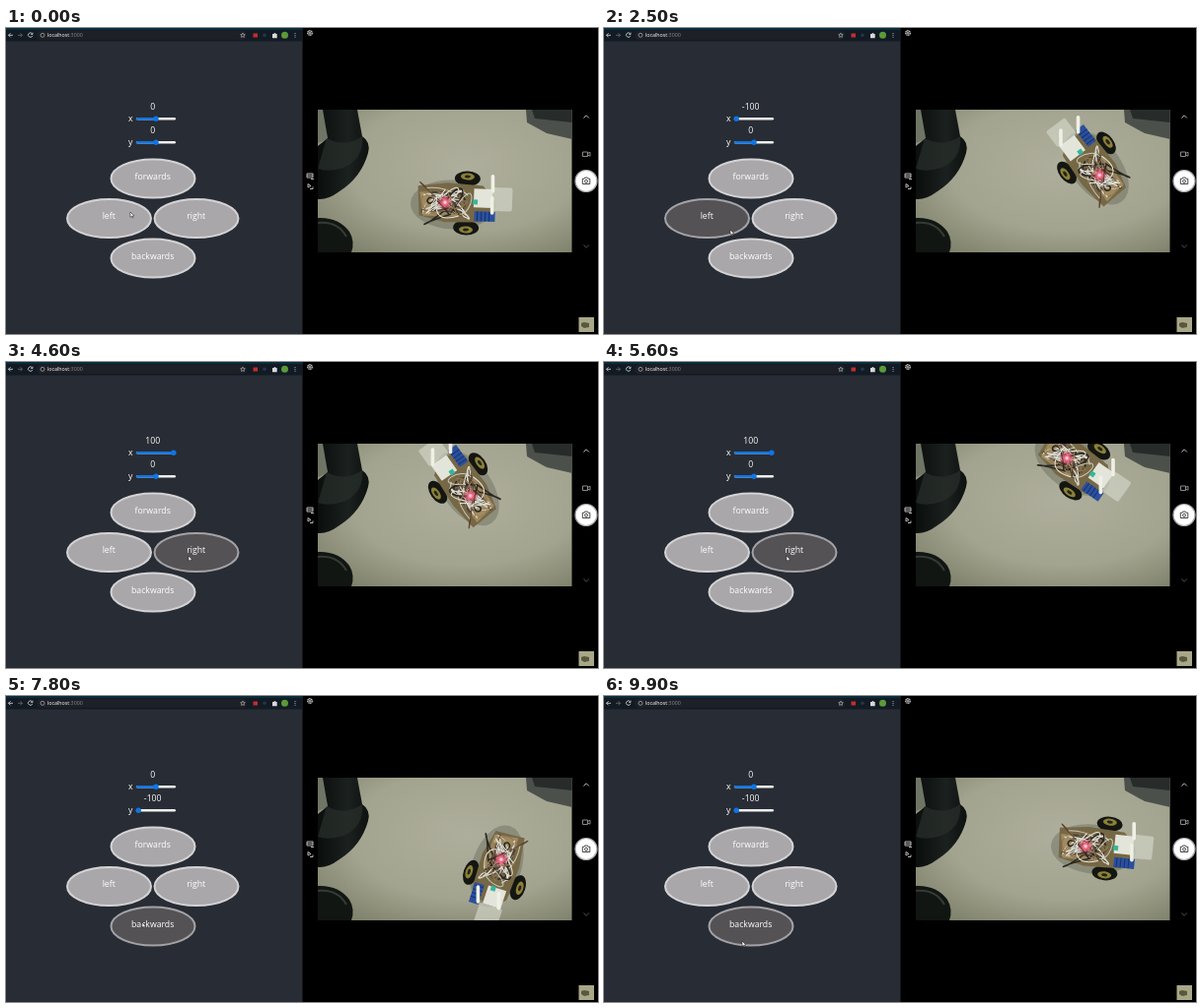
Write an HTML page that moves like this. It is 600x311 px and loops after 10 s.

```html
<!DOCTYPE html>
<html lang="en">
<head>
<meta charset="utf-8">
<title>Robot remote control</title>
<style>
html, body { margin: 0; height: 100%; overflow: hidden; background: #000; }
svg { display: block; }
text { font-family: "Open Sans", "Noto Sans", sans-serif; fill: #fff; }
#panel text { font-size: 8.7px; text-anchor: middle; }
#panel ellipse { fill: #a9a7a9; stroke: #d3d3d5; stroke-width: 2; }
#panel .on ellipse { fill: #545254; stroke: #a3a3a7; }
.icon { fill: none; stroke: #ccc; stroke-width: .9; }
</style>
</head>
<body>
<svg width="100%" height="100%" viewBox="0 0 600 311">
  <defs>
    <radialGradient id="floor" cx=".58" cy=".4" r=".75">
      <stop offset="0" stop-color="#aeae9c"/>
      <stop offset=".6" stop-color="#a3a48f"/>
      <stop offset="1" stop-color="#7d806a"/>
    </radialGradient>
    <radialGradient id="glow">
      <stop offset="0" stop-color="#fff"/>
      <stop offset=".3" stop-color="#f36b86"/>
      <stop offset="1" stop-color="#a0102c" stop-opacity="0"/>
    </radialGradient>
    <linearGradient id="stool">
      <stop offset="0" stop-color="#0a0e0d"/>
      <stop offset=".6" stop-color="#1b211f"/>
      <stop offset="1" stop-color="#0d1110"/>
    </linearGradient>
  </defs>

  <rect width="600" height="311"/>
  <rect width="300.5" height="311" fill="#282c34"/>

  <!-- browser bar -->
  <rect width="300.5" height="13.5" fill="#121b24"/>
  <rect width="300.5" height="2" fill="#0b2c3c"/>
  <rect x="31" y="2.8" width="213" height="9.2" rx="4.6" fill="#1d2026"/>
  <g class="icon" stroke-width=".8">
    <path d="M7 7.3H2.500M4.500 5.300l-2 2 2 2" />
    <path d="M12 7.300h4.500M14.500 5.300l2 2-2 2" stroke="#666"/>
    <path d="M26.500 5.800a2.200 2.200 0 1 0 .3 2M27 4.700v1.700h-1.700"/>
    <circle cx="37" cy="7.300" r="2" stroke="#999"/>
    <path d="M240 5l.7 1.500 1.600.2-1.200 1.100.3 1.600-1.400-.8-1.400.8.3-1.600-1.200-1.100 1.600-.2z" stroke-width=".6"/>
  </g>
  <text x="42" y="9.3" font-size="5.3">localhost<tspan fill="#858990">:3000</tspan></text>
  <rect x="250.500" y="5.500" width="4.500" height="4" fill="#c62c30"/>
  <circle cx="262" cy="7.300" r="1.800" fill="#25364a"/>
  <path d="M270 6h1.500a1 1 0 0 1 2 0h1.200v4.200H270z" fill="#d8d8d8"/>
  <circle cx="282.500" cy="7.300" r="3.500" fill="#5a9a38"/>
  <path d="M293 5v.9m0 1v.9m0 1v.9" class="icon"/>

  <g id="panel"></g>

  <!-- camera view -->
  <svg x="316" y="83" width="257.500" height="145" viewBox="316 83 257.5 145">
    <rect x="316" y="83" width="258" height="145" fill="url(#floor)"/>
    <path d="M316 83h6l4 30-10 4z" fill="#6f7565"/>
    <path d="M527 83h47v30l-26-6-20-11z" fill="#4b504b"/>
    <path d="M533 83h41v13l-38-4z" fill="#272c2a"/>
    <path d="M321 83H356L361 110Q370 116 367 127Q360 152 338 166Q326 175 316 174V120L326 112z" fill="url(#stool)"/>
    <path d="M325 112Q344 122 361 110Q363 133 342 142Q326 147 316 143" fill="#29302c" opacity=".7"/>
    <path d="M316 193Q337 192 348 207Q354 217 350 228H316z" fill="#111613"/>
    <path d="M316 198Q336 196 345 212" fill="none" stroke="#343b34" stroke-width="2"/>
    <g id="robot">
      <ellipse cx="-14" cy="2" rx="43" ry="25" fill="#33342a" opacity=".25"/>
      <g id="wheels"></g>
      <path d="M-50-16L-20-20 16-18 24-9V12L14 19-22 20-48 14z" fill="#766845"/>
      <path d="M-48-10H-8V14H-44z" fill="#a08a60"/>
      <rect x="-36" y="-11" width="28" height="21" fill="#4e443a"/>
      <rect x="7" y="-15" width="19" height="19" fill="#e3e5da"/>
      <rect x="26" y="-17" width="20" height="24" rx="2" fill="#d5d7ca" opacity=".65"/>
      <rect x="6" y="-4" width="5" height="5" fill="#35b69a"/>
      <rect x="8" y="8" width="21" height="10" fill="#2b4f9d"/>
      <path d="M11 8v10m4-10v10m4-10v10m4-10v10" stroke="#17326e"/>
      <g id="wires" fill="none"></g>
      <circle cx="-22" r="8" fill="url(#glow)"/>
      <g stroke="#f0f0e6" stroke-width="3.600" stroke-linecap="round">
        <path class="prong" d="M0 0V-15"/>
        <path class="prong" d="M0 0V-15"/>
      </g>
    </g>
  </svg>

  <!-- camera controls -->
  <g class="icon">
    <circle cx="308" cy="5" r="2.300" stroke-width="1.300" stroke-dasharray="1.300 .5"/>
    <circle cx="308" cy="5" r="1"/>
    <path d="M305 148h6v4h-6zM305 150h6M309 153.500h3"/>
    <path d="M306 158.500l3 2-3 1.500zM308 163.500h3v-2"/>
    <path d="M585.500 91.500l2.700-2.700 2.700 2.700"/>
    <path d="M585.500 220.500l2.700 2.700 2.700-2.700" stroke="#555"/>
    <path d="M584.500 126h5v4.500h-5zM589.500 127.500l2.500-1.300v4l-2.500-1.200" stroke="#999"/>
  </g>
  <circle cx="588" cy="155.500" r="11" fill="#fff" stroke="#aaa" stroke-width="1.200"/>
  <g fill="none" stroke="#333" stroke-width=".9">
    <path d="M584.300 153.200h1.700l.8-1.200h2.500l.8 1.200h1.700v5.300h-7.500z"/>
    <circle cx="588" cy="155.700" r="1.500"/>
  </g>
  <rect x="580.500" y="294" width="15.500" height="15" fill="#a8a888"/>
  <path d="M583 300l3-1 5 1v4l-5 1-3-2z" fill="#59583f"/>

  <path id="cursor" d="M0 0V5.200L1.300 4.200 2.200 6 3 5.600 2.200 3.900H3.800z" fill="#fff" stroke="#111" stroke-width=".5"/>
</svg>

<script>
const $ = id => document.getElementById(id);
const LOOP = 10000, STEP = 100;

// [start, pressed button, x, y]
const presses = [
  [0, '', 0, 0], [200, 'left', -100, 0], [1000, 'forwards', 0, 100],
  [1800, 'left', -100, 0], [2900, 'forwards', 0, 100], [3900, 'right', 100, 0],
  [5900, 'forwards', 0, 100], [7100, 'backwards', 0, -100],
  [8300, 'left', -100, 0], [9300, 'backwards', 0, -100]
];
// [time, x, y]
const pointer = [
  [0, 126, 187], [800, 126, 187], [1000, 147, 161], [1500, 147, 161],
  [1800, 128, 205], [2700, 128, 205], [2900, 150, 158], [3600, 150, 158],
  [3900, 185, 197], [5600, 185, 197], [5900, 164, 156], [6800, 164, 156],
  [7100, 138, 230], [8000, 138, 230], [8300, 127, 195], [9000, 127, 195],
  [9300, 140, 249]
];
// [time, axle x, axle y, heading]
const drive = [
  [0, 467, 178, 2], [200, 467, 178, 2], [1000, 475, 188, -86],
  [1400, 479, 170, -92], [1800, 482, 145, -93], [2500, 489, 132, -127],
  [2900, 490, 128, -155], [3900, 462, 116, -155], [4600, 458, 118, -125],
  [5900, 496, 108, 83], [6700, 500, 141, 83], [7200, 493, 193, 106],
  [7800, 495, 187, 108], [8300, 500, 176, 108], [9300, 524, 156, 5],
  [9900, 510, 155, 6]
];

const sliders = [['x', 92.3], ['y', 116.3]];
const buttons = [['forwards', 149, 153], ['left', 104.5, 193.5],
  ['right', 193, 193.5], ['backwards', 149, 234]];

$('panel').innerHTML =
  sliders.map(([name, y]) => `
    <text id="${name}Value" x="148.700" y="${y - 9.3}"/>
    <text x="126.300" y="${y + 2.7}">${name}</text>
    <rect x="132" y="${y - 1.3}" width="40" height="2.600" rx="1.300" fill="#efefef"/>
    <rect id="${name}Fill" x="132" y="${y - 1.3}" height="2.600" rx="1.300" fill="#0d75e6"/>
    <circle id="${name}Thumb" cy="${y}" r="2.700" fill="#0d75e6"/>`).join('') +
  buttons.map(([name, x, y]) => `
    <g id="${name}"><ellipse cx="${x}" cy="${y}" rx="42.500" ry="19.600"/>
    <text x="${x - .3}" y="${y + .6}">${name}</text></g>`).join('');

$('wheels').innerHTML = [-25, 25].map(y => `
  <ellipse cy="${y}" rx="13" ry="7.500" fill="#141612"/>
  <ellipse cy="${y * 1.08}" rx="7" ry="3.500" fill="#8c8136"/>
  <ellipse cy="${y * 1.08}" rx="3" ry="1.500" fill="#24251c"/>`).join('');

let seed = 7;
const rand = span => {
  seed = seed * 16807 % 2147483647;
  return (seed / 2147483647 - .5) * span;
};
const colors = ['#d8d8cc', '#c9c6b8', '#5b4430', '#2a2722', '#8f7650', '#e6e4da'];
let wires = '';
for (let i = 0; i < 30; i++) {
  const at = (w, h) => `${(rand(w) - 22).toFixed(1)} ${rand(h).toFixed(1)}`;
  wires += `<path d="M${at(46, 28)}C${at(72, 64)} ${at(72, 64)} ${at(46, 28)}"
    stroke="${colors[i % 6]}" stroke-width="${i % 3 ? 1 : 1.5}"/>`;
}
$('wires').innerHTML = wires;

function sample(keys, t) {
  const next = keys.findIndex(k => k[0] > t);
  if (next < 0) return keys.at(-1).slice(1);
  const a = keys[next - 1], b = keys[next], p = (t - a[0]) / (b[0] - a[0]);
  return a.slice(1).map((v, i) => v + (b[i + 1] - v) * p);
}

function setSlider(name, value) {
  const x = 152 + value * .178;
  $(name + 'Value').textContent = value;
  $(name + 'Fill').setAttribute('width', x - 132);
  $(name + 'Thumb').setAttribute('cx', x);
}

const prongs = document.querySelectorAll('.prong');

function draw() {
  const t = Math.floor(performance.now() % LOOP / STEP) * STEP;
  const [, pressed, x, y] = presses.findLast(p => p[0] <= t);
  setSlider('x', x);
  setSlider('y', y);
  for (const [name] of buttons) $(name).classList.toggle('on', name === pressed);

  $('cursor').setAttribute('transform', `translate(${sample(pointer, t)})`);
  const [rx, ry, heading] = sample(drive, t);
  $('robot').setAttribute('transform', `translate(${rx} ${ry}) rotate(${heading})`);
  // The prongs stand upright whatever the heading.
  prongs.forEach((p, i) =>
    p.setAttribute('transform', `translate(26 ${i ? 9 : -13}) rotate(${-heading})`));
  requestAnimationFrame(draw);
}
draw();
</script>
</body>
</html>
```
